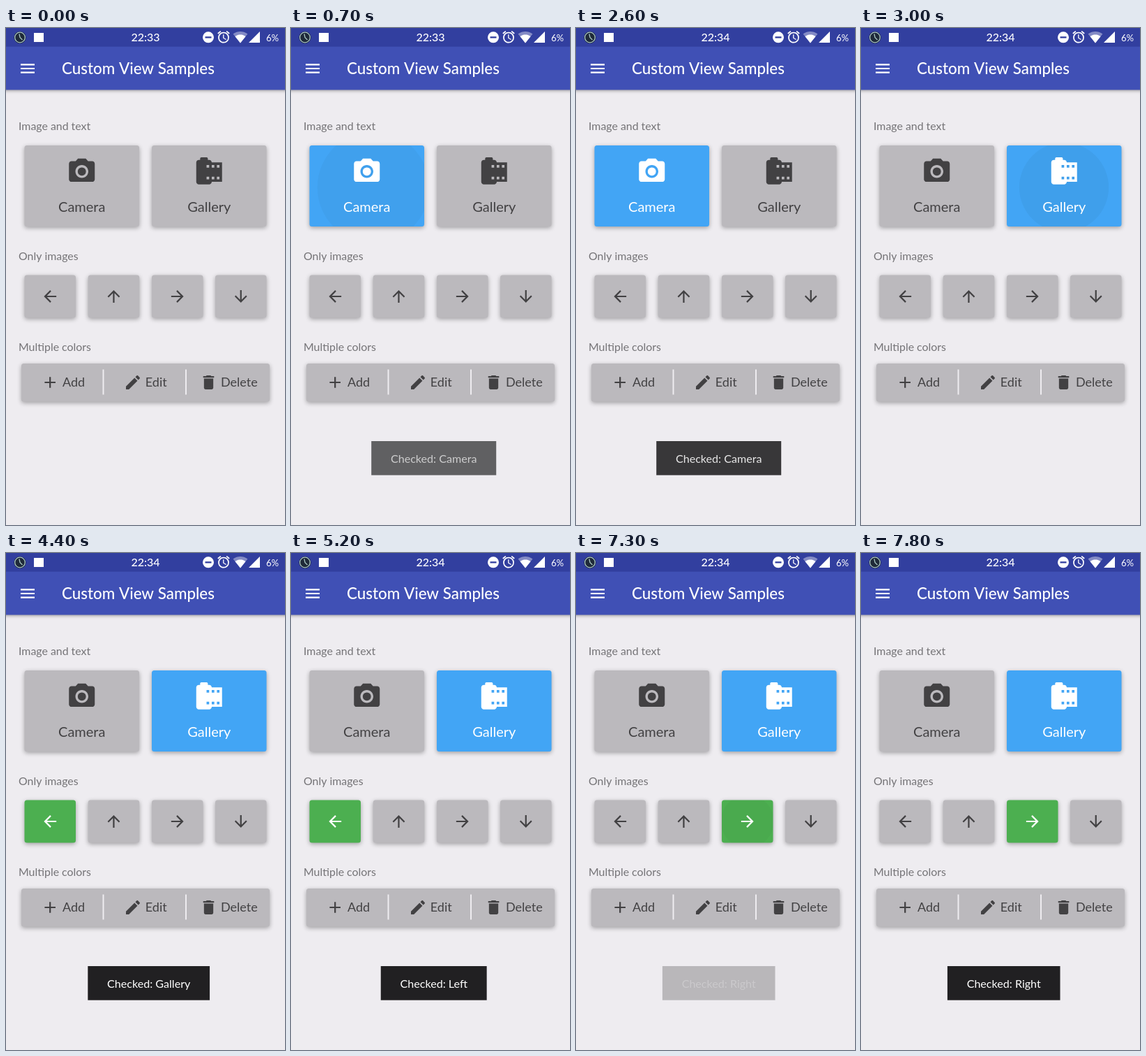
These frames come from a looping animation (400 by 711 pixels, 8 s). An HTML page with a canvas:

```html
<!DOCTYPE html>
<html lang="en">
<head>
<meta charset="utf-8">
<title>Custom View Samples</title>
<style>
  html, body { margin: 0; width: 100%; height: 100%; overflow: hidden; background: #eeecf0; }
  canvas { display: block; width: 400px; height: 711px; }
</style>
</head>
<body>
<canvas id="stage"></canvas>
<script>
const W = 400, H = 711, LOOP = 8000, STEP = 100;
const canvas = document.getElementById('stage');
const ctx = canvas.getContext('2d');
const dpr = window.devicePixelRatio || 1;
canvas.width = W * dpr;
canvas.height = H * dpr;

const BG = '#eeecf0', GREY = '#bbb9bd', INK = '#424143', LABEL = '#757477';
const BLUE = '#42a5f5', GREEN = '#4caf50', WHITE = '#fff';
const STATUS = '#323f9f', BAR = '#4050b5';

// Icon outlines on a 24-unit grid
const ICONS = {
  menu: 'M3 18h18v-2H3v2zm0-5h18v-2H3v2zm0-7v2h18V6H3z',
  camera: 'M15.2 12a3.2 3.2 0 1 1-6.4 0a3.2 3.2 0 1 1 6.4 0zM9 2L7.17 4H4c-1.1 0-2 .9-2 2v12c0 1.1.9 2 2 2h16c1.1 0 2-.9 2-2V6c0-1.1-.9-2-2-2h-3.17L15 2H9zm3 15c-2.76 0-5-2.24-5-5s2.24-5 5-5 5 2.24 5 5-2.24 5-5 5z',
  gallery: 'M14 5c0-1.1-.9-2-2-2h-1V2c0-.55-.45-1-1-1H6c-.55 0-1 .45-1 1v1H4c-1.1 0-2 .9-2 2v15c0 1.1.9 2 2 2h8c1.1 0 2-.9 2-2h8V5h-8zm-2 13h-2v-2h2v2zm0-9h-2V7h2v2zm4 9h-2v-2h2v2zm0-9h-2V7h2v2zm4 9h-2v-2h2v2zm0-9h-2V7h2v2z',
  arrow: 'M20 11H7.83l5.59-5.59L12 4l-8 8 8 8 1.41-1.41L7.83 13H20v-2z',
  add: 'M19 13h-6v6h-2v-6H5v-2h6V5h2v6h6v2z',
  edit: 'M3 17.25V21h3.75L17.81 9.94l-3.75-3.75L3 17.25zM20.71 7.04c.39-.39.39-1.02 0-1.41l-2.34-2.34c-.39-.39-1.02-.39-1.41 0l-1.83 1.83 3.75 3.75 1.83-1.83z',
  trash: 'M6 19c0 1.1.9 2 2 2h8c1.1 0 2-.9 2-2V7H6v12zM19 4h-3.5l-1-1h-5l-1 1H5v2h14V4z',
  alarm: 'M22 5.72l-4.6-3.86-1.29 1.53 4.6 3.86L22 5.72zM7.88 3.39L6.6 1.86 2 5.71l1.29 1.53 4.59-3.85zM12.5 8H11v6l4.75 2.85.75-1.23-4-2.37V8zM12 4c-4.97 0-9 4.03-9 9s4.02 9 9 9a9 9 0 0 0 0-18zm0 16c-3.87 0-7-3.13-7-7s3.13-7 7-7 7 3.13 7 7-3.13 7-7 7z',
  wifi: 'M12 21.5L23.64 7c-.45-.34-4.93-4-11.64-4C5.28 3 .81 6.66.36 7z',
  wifiLow: 'M3.53 10.95L12 21.5l8.47-10.55C20.04 10.62 16.81 8 12 8c-4.81 0-8.04 2.62-8.47 2.95z'
};
const paths = {};
for (const name in ICONS) paths[name] = new Path2D(ICONS[name]);

const BUTTONS = [
  { x: 26.5, y: 168, w: 164.5, h: 116, on: 400, off: 2800, color: BLUE, icon: 'camera', text: 'Camera', touch: [118, 228] },
  { x: 209, y: 168, w: 164.5, h: 116, on: 2800, off: LOOP, color: BLUE, icon: 'gallery', text: 'Gallery', touch: [291, 228] },
  { x: 26.5, y: 353.5, w: 73.5, h: 61, on: 4400, off: 7000, color: GREEN, turn: 0 },
  { x: 117.7, y: 353.5, w: 73.5, h: 61, turn: 1 },
  { x: 209, y: 353.5, w: 73.5, h: 61, on: 7000, off: LOOP, color: GREEN, turn: 2 },
  { x: 300, y: 353.5, w: 73.5, h: 61, turn: 3 }
];

const TOASTS = [
  { text: 'Camera', start: 480, end: 2555 },
  { text: 'Gallery', start: 3080, end: 4400 },
  { text: 'Left', start: 4700, end: 6850 },
  { text: 'Right', start: 7230, end: LOOP }
];

const clamp = v => Math.max(0, Math.min(1, v));

function icon(name, cx, cy, size, color, turn = 0) {
  ctx.save();
  ctx.translate(cx, cy);
  ctx.rotate(turn * Math.PI / 2);
  ctx.scale(size / 24, size / 24);
  ctx.translate(-12, -12);
  ctx.fillStyle = color;
  ctx.fill(paths[name], 'evenodd');
  ctx.restore();
}

function text(str, x, y, size, color, align = 'left', weight = 400) {
  ctx.font = `${weight} ${size}px Lato, sans-serif`;
  ctx.textAlign = align;
  ctx.fillStyle = color;
  ctx.fillText(str, x, y);
}

function rect(x, y, w, h, color) {
  ctx.fillStyle = color;
  ctx.fillRect(x, y, w, h);
}

function disc(x, y, r, color) {
  ctx.beginPath();
  ctx.arc(x, y, r, 0, 2 * Math.PI);
  ctx.fillStyle = color;
  ctx.fill();
}

function shadow(color, blur, dy) {
  ctx.shadowColor = color;
  ctx.shadowBlur = blur * dpr;
  ctx.shadowOffsetY = dy * dpr;
}

function card(x, y, w, h, color) {
  ctx.save();
  shadow('rgba(0,0,0,.33)', 6, 2);
  ctx.beginPath();
  ctx.roundRect(x, y, w, h, 3.5);
  ctx.fillStyle = color;
  ctx.fill();
  ctx.restore();
}

function header(t) {
  ctx.save();
  shadow('rgba(0,0,0,.4)', 5, 1.5);
  rect(-10, 0, W + 20, 88.5, BAR);
  ctx.restore();
  rect(0, 0, W, 26.7, STATUS);

  disc(20, 13.5, 8.6, '#1f2a38');
  ctx.strokeStyle = '#a9c5c4';
  ctx.lineWidth = 1.3;
  ctx.beginPath();
  ctx.arc(20, 13.5, 7.3, 0, 2 * Math.PI);
  ctx.moveTo(19, 8.5);
  ctx.lineTo(20, 13.5);
  ctx.lineTo(23.5, 17);
  ctx.stroke();
  rect(40, 7, 14, 13, WHITE);

  text(t < 2100 ? '22:33' : '22:34', 200, 19.3, 16, WHITE, 'center', 500);
  disc(290, 13.3, 8, WHITE);
  rect(285.5, 12.2, 9, 2.3, STATUS);
  icon('alarm', 312, 12.8, 21, WHITE);
  icon('wifi', 336, 13, 21.5, 'rgba(255,255,255,.4)');
  icon('wifiLow', 336, 13, 21.5, WHITE);
  ctx.beginPath();
  ctx.moveTo(348, 21);
  ctx.lineTo(364, 21);
  ctx.lineTo(364, 5);
  ctx.fillStyle = WHITE;
  ctx.fill();
  text('6%', 382, 18.6, 13.2, WHITE, 'center');

  icon('menu', 31, 58, 26.67, WHITE);
  text('Custom View Samples', 80, 66.3, 22.4, WHITE, 'left', 500);
}

function ripple(b, age) {
  if (age < 0 || age >= 800) return;
  const cx = b.x + b.w / 2, cy = b.y + b.h / 2;
  const [x, y] = b.touch || [cx, cy];
  const reach = Math.hypot(b.w, b.h) / 2;
  const grow = 1 - (1 - clamp(age / 400)) ** 2;
  ctx.save();
  ctx.beginPath();
  ctx.roundRect(b.x, b.y, b.w, b.h, 3.5);
  ctx.clip();
  disc(x, y, reach * grow * .85, `rgba(0,0,0,${.05 * (1 - age / 800)})`);
  ctx.restore();
}

function button(b, t) {
  const on = t >= b.on && t < b.off;
  const ink = on ? WHITE : INK;
  const cx = b.x + b.w / 2;
  card(b.x, b.y, b.w, b.h, on ? b.color : GREY);
  if (on) ripple(b, t - b.on);
  if (b.icon) {
    icon(b.icon, cx, 205.3, 44.4, ink);
    text(b.text, cx, 262.7, 20, ink, 'center');
  } else {
    icon('arrow', cx, b.y + b.h / 2, 26.67, ink, b.turn);
  }
}

function actions() {
  card(22, 480, 356, 54.5, GREY);
  for (const x of [138.5, 257]) rect(x, 488.5, 2, 36, BG);
  const items = [['add', 63.2, 'Add', 81], ['edit', 182, 'Edit', 199.8], ['trash', 290.5, 'Delete', 308]];
  for (const [name, ix, str, x] of items) {
    icon(name, ix, 507, 26.67, INK);
    text(str, x, 513.4, 18, INK);
  }
}

function toast({ text: name, start, end }, t) {
  const fadeIn = 1 - (1 - clamp((t - start) / 500)) ** 2;
  const fadeOut = 1 - clamp((t - end) / 400);
  const alpha = fadeIn * fadeOut;
  if (alpha <= 0) return;
  const str = 'Checked: ' + name, mid = 204.7, size = 16.1;
  ctx.font = `400 ${size}px Lato, sans-serif`;
  const w = ctx.measureText(str).width + 55.5;
  ctx.globalAlpha = alpha;
  rect(mid - w / 2, 591, w, 48.7, '#212022');
  text(str, mid, 622.3, size, WHITE, 'center');
  ctx.globalAlpha = 1;
}

function draw(now) {
  const t = Math.floor((now % LOOP) / STEP) * STEP;
  ctx.setTransform(dpr, 0, 0, dpr, 0, 0);
  rect(0, 0, W, H, BG);
  header(t);
  text('Image and text', 18, 146, 15.9, LABEL);
  text('Only images', 18, 332, 15.9, LABEL);
  text('Multiple colors', 18, 462.2, 15.9, LABEL);
  for (const b of BUTTONS) button(b, t);
  actions();
  for (const item of TOASTS) toast(item, t);
  requestAnimationFrame(draw);
}
requestAnimationFrame(draw);
</script>
</body>
</html>
```
